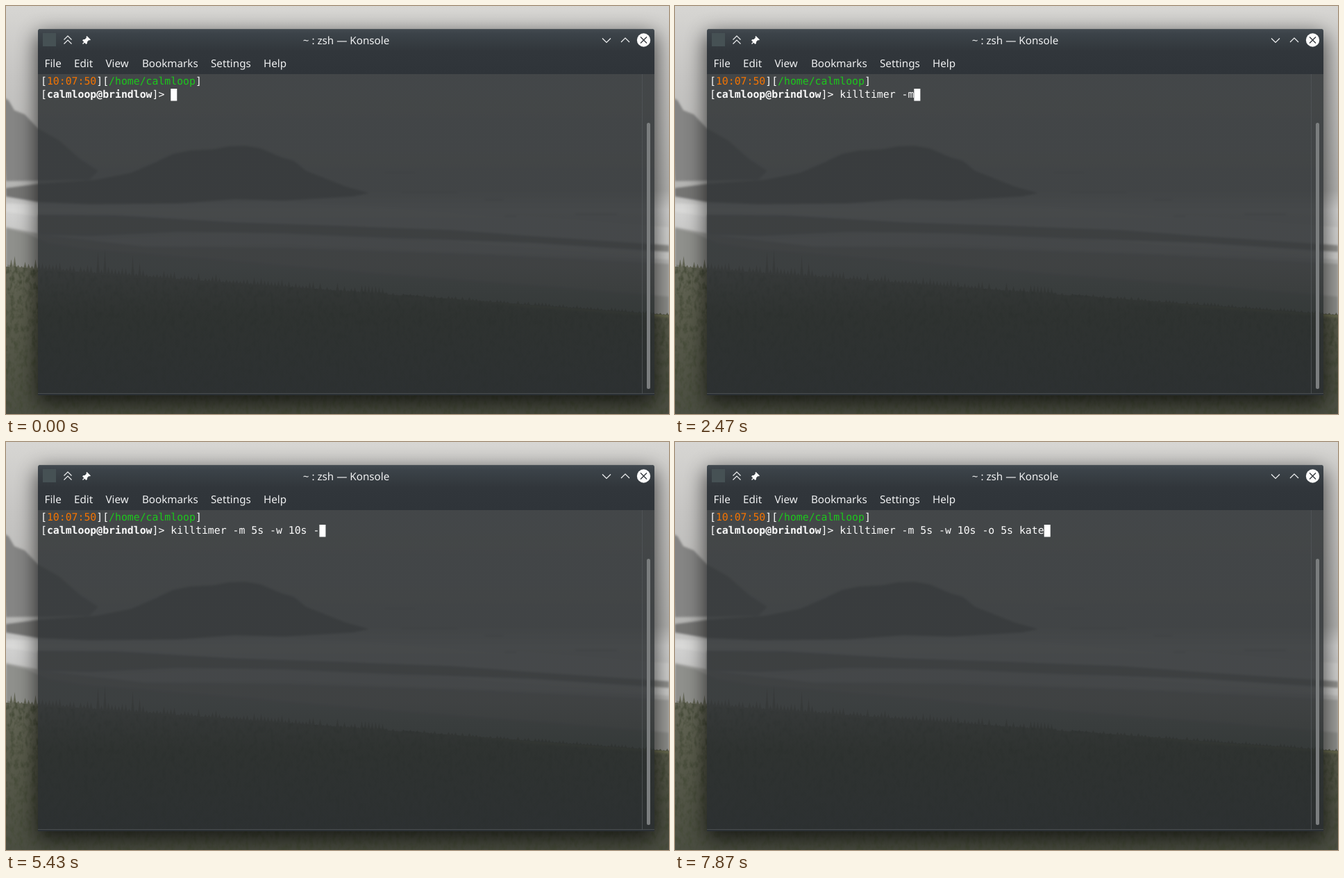
An HTML page for the animation above (8000 ms loop, 955 by 587 pixels).

```html
<!DOCTYPE html>
<html lang="en">
<head>
<meta charset="utf-8">
<title>Terminal</title>
<style>
  html, body { margin: 0; width: 100%; height: 100%; overflow: hidden; background: #888; }
  svg { display: block; width: 100%; height: 100%; }
  text { white-space: pre; text-rendering: geometricPrecision; }
  .ui { font: 15.2px "Noto Sans", sans-serif; fill: #eff0f1; }
  .mono { font: 14.82px "DejaVu Sans Mono", monospace; fill: #fcfcfc; }
  .bold { font-weight: bold; }
  .icon { fill: none; stroke: #eff0f1; stroke-width: 1.2; }
</style>
</head>
<body>
<svg viewBox="0 0 955 587">
  <defs>
    <linearGradient id="sky" x2="0" y2="1">
      <stop offset="0" stop-color="#d7d6d3"/>
      <stop offset=".17" stop-color="#c6c5c3"/>
      <stop offset=".45" stop-color="#b4b4b2"/>
      <stop offset=".5" stop-color="#d2d2d1"/>
      <stop offset=".62" stop-color="#bcbcba"/>
    </linearGradient>
    <linearGradient id="forest" x2="0" y2="1">
      <stop offset="0" stop-color="#666859"/>
      <stop offset=".4" stop-color="#595b4b"/>
      <stop offset="1" stop-color="#4b4e42"/>
    </linearGradient>
    <linearGradient id="glass" x2="0" y2="1">
      <stop offset="0" stop-color="#313537"/>
      <stop offset=".6" stop-color="#313436"/>
      <stop offset=".75" stop-color="#292d2d"/>
      <stop offset="1" stop-color="#282c2f"/>
    </linearGradient>
    <linearGradient id="bar" x2="0" y2="1">
      <stop offset="0" stop-color="#434a50"/>
      <stop offset=".12" stop-color="#3b4248"/>
      <stop offset=".5" stop-color="#31363b"/>
      <stop offset="1" stop-color="#2f3439"/>
    </linearGradient>
    <filter id="soft"><feGaussianBlur stdDeviation="1.5"/></filter>
    <filter id="shade" x="-20%" y="-20%" width="140%" height="140%"><feGaussianBlur stdDeviation="15"/></filter>
    <filter id="grain" x="0" y="0" width="1" height="1">
      <feTurbulence type="fractalNoise" baseFrequency=".16 .1" numOctaves="3" seed="4"/>
      <feColorMatrix values="0 0 0 0 .06  0 0 0 0 .07  0 0 0 0 .04  2.6 0 0 0 -1.1"/>
    </filter>
    <clipPath id="ground"><path d="M0 372L46 380 280 398 540 412 720 428 955 445V587H0Z"/></clipPath>
    <clipPath id="outside"><path clip-rule="evenodd" d="M0 0H955V587H0ZM46 560V36Q46 33 49 33H931Q934 33 934 36V560Z"/></clipPath>
  </defs>

  <rect width="955" height="587" fill="url(#sky)"/>
  <g filter="url(#soft)">
    <path fill="#858584" d="M-9 128L4 136 12 150 27 156 46 176 76 193 108 221 133 237 120 250 0 252Z"/>
    <path fill="#747473" d="M0 262L46 256 130 250 180 240 215 225 240 213 265 208 300 206 320 202 345 201 367 205 395 217 415 223 432 237 460 248 490 260 523 269 500 274 400 280 330 278 250 284 120 285 46 282 0 274Z"/>
    <path fill="#dededd" d="M0 284L120 288 400 283 560 290 955 318V365L700 345 400 320 46 303 0 296Z" opacity=".6"/>
    <path fill="#92928f" d="M46 300L160 301 330 311 480 316 640 322 760 331 955 344V354L760 341 560 334 400 327 250 325 120 331 46 329Z"/>
    <path fill="#d0d0ce" d="M100 338L330 327 560 337 760 347 955 358V364L700 356 400 343 160 347Z" opacity=".7"/>
    <path fill="#a2a29f" d="M0 318L60 330 200 346 400 348 700 358 955 371V450H0Z"/>
    <path fill="#838481" d="M0 320L30 327 60 341 120 350 300 364 540 385 790 404 955 418V460H0Z" opacity=".6"/>
    <path stroke="#929290" stroke-width="2" opacity=".6" d="M690 279H716M718 303H735M545 240H590M820 300H880M570 268H650"/>
  </g>
  <path id="trees" fill="url(#forest)"/>
  <g clip-path="url(#ground)">
    <rect y="365" width="955" height="222" filter="url(#grain)"/>
    <path filter="url(#soft)" fill="#777954" d="M540 408L760 412 955 418V448L760 434Z" opacity=".7"/>
  </g>

  <g clip-path="url(#outside)">
    <rect x="44" y="40" width="892" height="532" rx="6" filter="url(#shade)" opacity=".68"/>
  </g>
  <rect x="46" y="97" width="888" height="463" fill="url(#glass)" opacity=".88"/>
  <path fill="url(#bar)" d="M46 98V36Q46 33 49 33H931Q934 33 934 36V98Z"/>
  <path stroke="#50575c" d="M49 33.5H931"/>
  <path stroke="#53575a" d="M916.5 98V558M46 557.5H934" fill="none" opacity=".75"/>
  <path stroke="#2b3034" stroke-width="2" d="M46 559H934"/>
  <rect x="923" y="168" width="5" height="383" rx="2.5" fill="#7b7e7f"/>

  <rect x="53" y="39" width="19" height="19" fill="#465154"/>
  <g class="icon">
    <path d="M83.500 48.500l5.500-5.500 5.500 5.500M83.500 54.500l5.500-5.500 5.500 5.500M859 46.500l6 6 6-6M886 52l6-6 6 6"/>
    <path d="M110.500 54.500l4-4" stroke-width="1.500"/>
  </g>
  <path fill="#fcfcfc" d="M116.500 43l5.500 5.500-1.500 1-1-.5-2.500 2.500v2l-1.500 1.500-5.500-5.500 1.500-1.500h2l2.500-2.500-.5-1Z"/>
  <circle cx="918.500" cy="49" r="9.700" fill="#fcfcfc"/>
  <path stroke="#31363b" stroke-width="1.300" d="M914 44.500l9 9M923 44.500l-9 9"/>

  <text class="ui" x="490" y="55" text-anchor="middle">~ : zsh — Konsole</text>
  <g id="menu" class="ui"></g>

  <g class="mono">
    <text x="50" y="113">[<tspan fill="#f67400">10:07:50</tspan>][<tspan fill="#1cc81c">/home/calmloop</tspan>]</text>
    <text x="50" y="132">[<tspan class="bold">calmloop@brindlow</tspan>]&gt; </text>
    <text id="typed" x="237.300" y="132"></text>
  </g>
  <rect id="cursor" y="119" width="9" height="17.500" fill="#fff"/>
</svg>
<script>
const $ = id => document.getElementById(id);
const LOOP = 8000, CELL = 8.922, LEFT = 237.3;
const command = "killtimer -m 5s -w 10s -o 5s kate";
// One time per character; repeated times arrive together.
const keys = [
  330, 500, 730, 1400, 1400, 1400, 1600, 1600, 1600, 2030, 2230, 2470,
  3030, 3170, 3470, 3600, 4000, 4170, 4300, 4570, 4700, 5070, 5170, 5430,
  6170, 6170, 6670, 7030, 7130, 7530, 7630, 7770, 7870
];

const menu = { File: 55.5, Edit: 98, View: 143.5, Bookmarks: 196, Settings: 295, Help: 371 };
$("menu").innerHTML = Object.entries(menu)
  .map(([name, x]) => `<text x="${x}" y="88">${name}</text>`).join("");

let seed = 7;
const random = () => (seed = seed * 16807 % 2147483647) / 2147483647;

// A ragged treeline with a few taller spruces on the left.
function treeline() {
  const tall = [[10, 16], [40, 14], [76, 12], [128, 32], [138, 36], [180, 30], [188, 20], [535, 10]];
  let d = "M0 587V374";
  for (let x = 0; x < 960; x += 5) {
    const base = 375 + x * .073;
    const spruce = tall.find(([at]) => Math.abs(at - x) < 3);
    const rise = spruce ? spruce[1] : random() * (x < 560 ? 12 : 5);
    d += `L${x} ${base}L${x + 1.5} ${base - rise * .5}L${x + 2.5} ${base - rise}L${x + 3.5} ${base - rise * .5}`;
  }
  return d + "L960 587Z";
}
$("trees").setAttribute("d", treeline());

function draw(time) {
  const count = keys.filter(key => key <= time).length;
  $("typed").textContent = command.slice(0, count);
  $("cursor").setAttribute("x", LEFT + count * CELL);
}

const start = performance.now();
function tick() {
  draw((performance.now() - start) % LOOP);
  requestAnimationFrame(tick);
}
tick();
</script>
</body>
</html>
```
